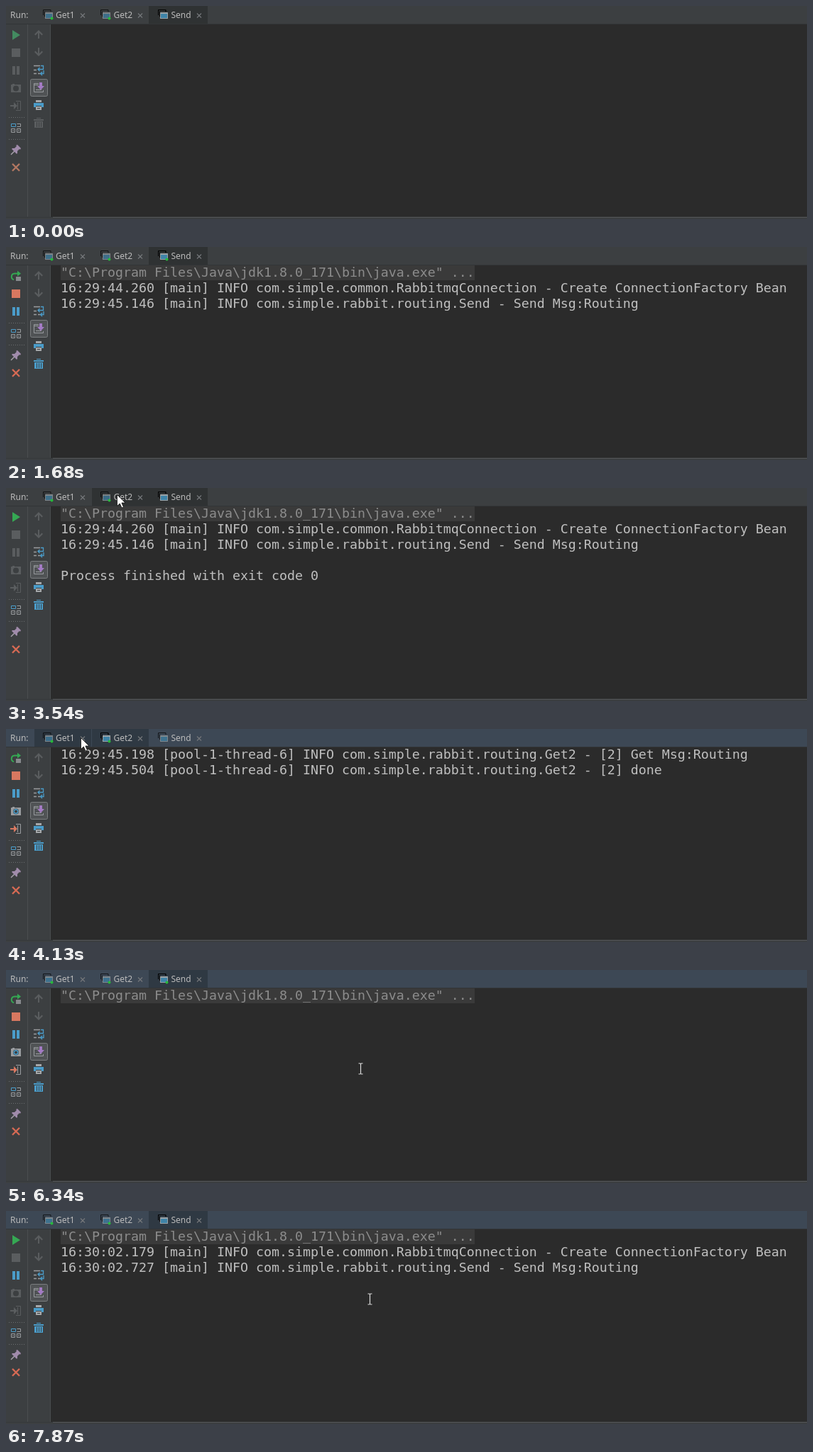
Animation of 1128 by 301 pixels, one loop 8 s. Source, as an HTML page:

```html
<!DOCTYPE html>
<html lang="en">
<head>
<meta charset="utf-8">
<title>Run console</title>
<style>
html, body { margin: 0; width: 100%; height: 100%; overflow: hidden; background: #3c3f41; }
svg { display: block; }
.ui { font: 12px "Noto Sans", "Open Sans", sans-serif; fill: #bbb; }
.log { font: 18.271px "DejaVu Sans Mono", monospace; fill: #bfbfbf; }
.cmd { fill: #8c8c8c; }
.line { fill: none; stroke: currentColor; }
.dim { color: #5a5d5f; }
.gray { color: #9a9da0; }
.blue { color: #4a9cc9; }
.red { color: #d87860; }
.green { color: #35a853; }
.fill { fill: currentColor; }
</style>
</head>
<body>
<svg width="1128" height="301" viewBox="0 0 1128 301">
  <defs>
    <path id="play" class="fill" d="M9 34L20 41 9 48Z"/>
    <path id="stop" class="fill" d="M8 60h12v12H8Z"/>
    <path id="pause" class="fill" d="M9 85h4v12H9ZM15 85h4v12h-4Z"/>
    <path id="close" class="line" stroke-width="2.4" d="M9 223l10 10M19 223l-10 10"/>
    <path id="dots" stroke="#6b6e70" stroke-dasharray="1 2" d="M4 .5H27"/>
    <g id="camera">
      <path class="fill" d="M7 111h2v-1h3v1h9v11H7Z"/>
      <circle cx="14" cy="116.5" r="4" fill="#3c3f41"/>
    </g>
    <path id="door" class="line" d="M14 134.500H20.500V147.500H14M16.500 136v10"/>
    <path id="into" class="fill" d="M6 140h5v-4l5 5-5 5v-4H6Z"/>
    <g id="tail">
      <use href="#dots" y="157"/>
      <g class="gray line">
        <path d="M7.500 173.500h5v5h-5ZM15.500 173.500h5v5h-5ZM15.500 166.500h5v4h-5M9 176h2M17 176h2"/>
        <path stroke="#4a9cc9" d="M7.500 166.500h6v4h-6Z"/>
      </g>
      <use href="#dots" y="188"/>
      <path stroke="#a9a3ad" stroke-width="1.500" d="M7 210l5-5"/>
      <path fill="#a08bab" d="M9 201l3 0 3-3-1-1 2-1 5 5-1 2-1-1-3 3 0 3-1 1-7-7Z"/>
    </g>
    <g id="trash">
      <path class="fill" d="M39 160h14v2H39ZM43 158h6v1h-6ZM40 163h12v9H40Z"/>
      <path stroke="#3c3f41" d="M43.500 164v7M46.500 164v7M49.500 164v7"/>
    </g>
    <g id="win">
      <path class="line" stroke="#8d9499" d="M52.500 13V5.500H63V8M54.500 15V7.500" />
      <path fill="#9aa2a6" d="M55 9h11v9H55Z"/>
      <path fill="#3f84a8" d="M56 11h9v6h-9Z"/>
    </g>
    <path id="tabx" stroke="#74777a" stroke-width="1.200" d="M105 10.500l6 6M111 10.500l-6 6"/>
  </defs>

  <!-- header -->
  <rect width="1128" height="26" fill="#3c3f41"/>
  <rect width="1128" height="26" fill="#3d4855" data-on="3620-8000"/>
  <rect x="201" width="83" height="26" fill="#2f3233" data-on="0-3620"/>
  <rect x="121" width="80" height="26" fill="#2f3233" data-on="3210-3620"/>
  <g fill="#2f3943">
    <rect x="121" width="80" height="26" data-on="3620-5020"/>
    <rect x="40" width="80" height="26" data-on="4080-5840"/>
    <rect x="201" width="83" height="26" data-on="5840-8000"/>
  </g>
  <path stroke="#323537" d="M0 25.500H1128"/>
  <g opacity=".7"><use href="#win"/><use href="#win" x="81"/><use href="#win" x="162"/></g>
  <use href="#win" data-on="5020-5840"/>
  <use href="#win" x="81" data-on="3620-5020"/>
  <use href="#win" x="162" data-on="0-3620 5840-8000"/>
  <g fill="#27b83c">
    <circle cx="64.500" cy="17.500" r="2"/>
    <circle cx="145.500" cy="17.500" r="2"/>
    <circle cx="226.500" cy="17.500" r="2" data-on="550-1960 5840-7870"/>
  </g>
  <use href="#tabx"/><use href="#tabx" x="81"/><use href="#tabx" x="164"/>
  <g class="ui">
    <text x="6" y="17">Run:</text>
    <text x="70" y="17">Get1</text>
    <text x="151.500" y="17">Get2</text>
    <text x="232.500" y="17">Send</text>
  </g>

  <!-- console -->
  <rect x="63" y="26" width="1065" height="272" fill="#2b2b2b"/>
  <path stroke="#4a4d4f" d="M30.500 26V298M62.500 26V298"/>
  <path stroke="#35383a" d="M0 298.500H1128"/>
  <path stroke="#555759" d="M66 298.500H1128"/>

  <!-- left tools -->
  <g class="dim" data-on="0-550 1960-3620 7870-8000">
    <use href="#stop"/><use href="#pause"/><use href="#camera"/><use href="#door"/><use href="#into"/>
  </g>
  <use href="#play" color="#438b60" data-on="0-280"/>
  <use href="#play" class="dim" data-on="280-550"/>
  <use href="#play" class="green" data-on="1960-3620 7870-8000"/>
  <g data-on="550-1960 3620-7870">
    <path class="green line" stroke-width="2" d="M17 37.500H12a4.500 4.500 0 0 0-1 8.800"/>
    <path class="green fill" d="M16 33.500l5 4-5 4Z"/>
    <path class="gray fill" opacity=".8" d="M14 42h7v6h-7Z"/>
    <use href="#stop" class="red"/>
  </g>
  <use href="#pause" class="blue" data-on="550-2140 3620-8000"/>
  <g data-on="3620-5840 6340-7870">
    <use href="#camera" class="gray"/>
    <circle cx="14" cy="116.500" r="2.800" fill="none" stroke="#4a9cc9" stroke-width="1.500"/>
    <use href="#door" class="gray"/>
    <use href="#into" class="red"/>
  </g>
  <use href="#tail" data-on="0-550 1960-5840 6340-8000"/>
  <use href="#close" color="#b27762" data-on="0-550"/>
  <use href="#close" color="#d66a54" data-on="1960-5840 6340-8000"/>
  <g transform="translate(0 -50)" data-on="550-1960 5840-6340">
    <use href="#tail"/><use href="#close" color="#d66a54"/>
  </g>

  <!-- right tools -->
  <g class="dim">
    <path class="fill" d="M46 34l6 6-1.500 1.500L47 38v8h-2v-8l-3.500 3.500L40 40Z"/>
    <path class="fill" d="M46 71l6-6-1.500-1.500L47 67v-8h-2v8l-3.500-3.500L40 65Z"/>
  </g>
  <path class="gray line" d="M39 84.500h9M39 90.500h4M39 95.500h4M45 95.500h3" stroke-width="1.400"/>
  <path class="blue line" d="M49 84.500h3.500v5H45M47.500 87L45 89.500 47.500 92M53 91v4.500h-4M51 93l-2.500 2.500L51 98" stroke-width="1.300"/>
  <rect x="34.500" y="103.500" width="24" height="24" rx="2" fill="#505355" stroke="#7b7e80"/>
  <path class="gray line" d="M46 109.500H39.500V121.500H52.500V119M39 111.500h7M42 118.500h8"/>
  <path fill="#a37bc4" d="M47 108h4v5h3l-5 5.500-5-5.500h3Z"/>
  <path class="blue fill" d="M39 137h14v6h-3v-2h-8v2h-3Z"/>
  <path fill="#a5a8aa" d="M42 133h8v3h-8ZM42 142h8v5h-8Z"/>
  <path stroke="#3c3f41" d="M44 144.500h4"/>
  <use href="#trash" class="dim" data-on="0-550"/>
  <use href="#trash" class="blue" data-on="550-8000"/>

  <!-- output -->
  <g class="log">
    <g data-on="550-3620 5840-8000">
      <rect x="77" y="26" width="583" height="21" fill="#3a3a3a"/>
      <text class="cmd" x="77" y="42">"C:\Program Files\Java\jdk1.8.0_171\bin\java.exe" ...</text>
    </g>
    <text x="77" y="64" data-on="850-3620">16:29:44.260 [main] INFO com.simple.common.RabbitmqConnection - Create ConnectionFactory Bean</text>
    <text x="77" y="86" data-on="1680-3620">16:29:45.146 [main] INFO com.simple.rabbit.routing.Send - Send Msg:Routing</text>
    <text x="77" y="130" data-on="2140-3620">Process finished with exit code 0</text>
    <g data-on="3620-5020">
      <text x="77" y="42">16:29:45.198 [pool-1-thread-6] INFO com.simple.rabbit.routing.Get2 - [2] Get Msg:Routing</text>
      <text x="77" y="64">16:29:45.504 [pool-1-thread-6] INFO com.simple.rabbit.routing.Get2 - [2] done</text>
    </g>
    <g data-on="5020-5840">
      <text x="77" y="42">16:29:45.197 [pool-1-thread-5] INFO com.simple.rabbit.routing.Get1 - [1] Get Msg:Routing</text>
      <text x="77" y="64">16:29:45.499 [pool-1-thread-5] INFO com.simple.rabbit.routing.Get1 - [1] done</text>
    </g>
    <rect x="77" y="69" width="2" height="22" fill="#bbb" data-on="3620-4110 4610-5840"/>
    <text x="77" y="64" data-on="7050-8000">16:30:02.179 [main] INFO com.simple.common.RabbitmqConnection - Create ConnectionFactory Bean</text>
    <text x="77" y="86" data-on="7690-8000">16:30:02.727 [main] INFO com.simple.rabbit.routing.Send - Send Msg:Routing</text>
  </g>

  <!-- pointers -->
  <path id="arrow" data-on="3210-5840" fill="#fff" stroke="#111" stroke-width=".8" d="M0 0V16L3.800 12.500 6.500 18.500 9 17.500 6.400 11.500H11.500Z"/>
  <path id="beam" data-on="6160-8000" fill="none" stroke="#ddd" stroke-width="1.200" d="M-3-7.500H-1L0-7 1-7.500H3M0-7V7M-3 7.500H-1L0 7 1 7.500H3"/>
</svg>
<script>
const LOOP = 8000;
const parts = [...document.querySelectorAll('[data-on]')].map(el => ({
  el, spans: el.dataset.on.split(' ').map(s => s.split('-').map(Number))
}));

// each stop: time, x, y
const paths = {
  arrow: [[3210, 155, 6], [3310, 155, 6], [3460, 156, 9], [3930, 156, 9], [4130, 105, 12],
          [4330, 95, 11], [4530, 95, 11], [4820, 88, 12]],
  beam: [[6160, 499, 142], [6339, 499, 142], [6340, 499, 139], [6390, 499, 139],
         [6670, 512, 126], [7050, 512, 126], [7180, 512, 124]]
};

function along(stops, t) {
  const i = stops.findIndex(s => s[0] > t);
  if (i < 0) return stops[stops.length - 1].slice(1);
  if (i === 0) return stops[0].slice(1);
  const [a, b] = [stops[i - 1], stops[i]];
  const k = (t - a[0]) / (b[0] - a[0]);
  return [1, 2].map(n => Math.round(a[n] + (b[n] - a[n]) * k));
}

function draw(t) {
  for (const { el, spans } of parts) {
    el.style.display = spans.some(([from, to]) => t >= from && t < to) ? '' : 'none';
  }
  for (const id in paths) {
    const [x, y] = along(paths[id], t);
    document.getElementById(id).setAttribute('transform', `translate(${x + .5} ${y + .5})`);
  }
}

const start = performance.now();
function tick() {
  draw((performance.now() - start) % LOOP);
  requestAnimationFrame(tick);
}
tick();
</script>
</body>
</html>
```
